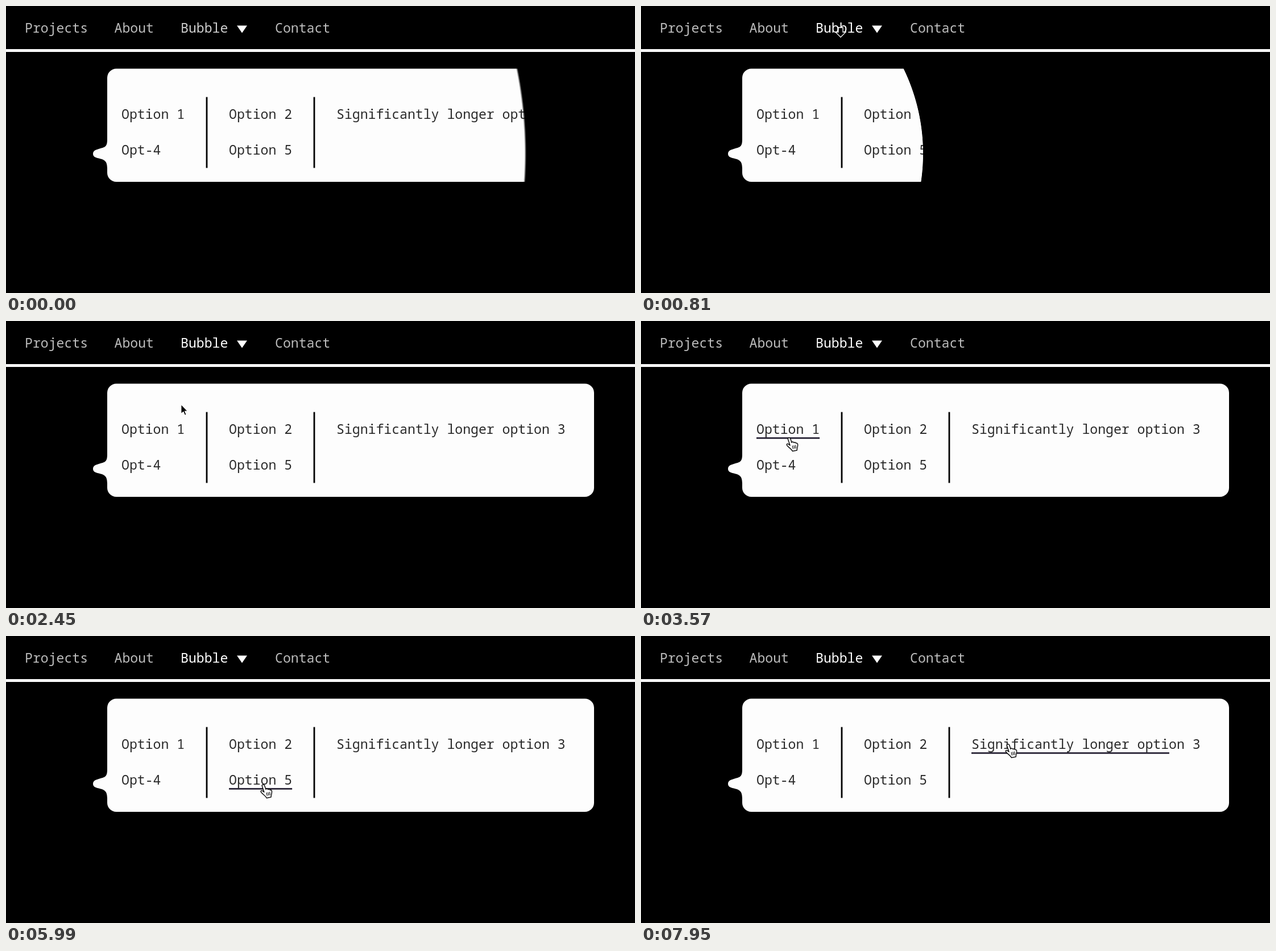
Recreate the animation shown at these times as an HTML page. Size 1106x506 px, loop 8000 ms.

```html
<!DOCTYPE html>
<html lang="en">
<head>
<meta charset="utf-8">
<title>Bubble menu</title>
<style>
  html, body { margin: 0; width: 100%; height: 100%; overflow: hidden; background: #000; }
  svg { display: block; width: 1106px; height: 506px; }
  text { font: 23.15px "Noto Sans Mono", "DejaVu Sans Mono", monospace; white-space: pre; }
  #nav text { fill: #bdbdbd; }
  #panel text { fill: #2a2a2a; }
</style>
</head>
<body>
<svg viewBox="0 0 1106 506">
  <defs>
    <radialGradient id="reveal" gradientUnits="userSpaceOnUse" cx="153" cy="260" r="1">
      <stop id="edge" offset="1" stop-color="#fff"/>
      <stop offset="1" stop-color="#000"/>
    </radialGradient>
    <mask id="mask" maskUnits="userSpaceOnUse" x="0" y="0" width="1106" height="506">
      <rect width="1106" height="506" fill="url(#reveal)"/>
    </mask>
  </defs>
  <rect width="1106" height="506"/>
  <g id="nav">
    <text x="33" y="47">Projects</text>
    <text x="190.5" y="47">About</text>
    <text x="307" y="47" id="trigger">Bubble</text>
    <text x="473" y="47">Contact</text>
    <path d="M406 34.5H424L415 47.5Z" fill="#fff"/>
    <rect y="76" width="1106" height="5" fill="#fff"/>
  </g>
  <g id="panel" mask="url(#mask)">
    <path fill="#fdfdfd" d="M194 110.5H1018A16 16 0 0 1 1034 126.5V294A16 16 0 0 1 1018 310H194A16 16 0 0 1 178 294V286
      C178 272 172 271 163 268.5C156 267 153 265 153 260.5C153 256 156 254 163 252C172 249 178 250 178 236V126.5A16 16 0 0 1 194 110.5Z"/>
    <path d="M353 160.5V285.5M542 160.5V285.5" stroke="#000" stroke-width="2.8"/>
  </g>
  <g id="cursor">
    <g id="arrow" fill="#000" stroke="#fff" stroke-width="1.3">
      <path d="M0 0V17L4 13.5L6.6 19.5L9.4 18.3L6.9 12.4H12Z"/>
    </g>
    <g id="down" fill="#000" stroke="#fff" stroke-width="1.3">
      <path d="M0 9L-9 0H-4V-8H4V0H9Z"/>
    </g>
    <g id="hand" stroke-linejoin="round" stroke-linecap="round">
      <path id="palm" fill="#fff" stroke="#111" stroke-width="1.5" d="M-1.7 2C-2 -.6 1.9 -1 2.8 1.6L5 8.2C6 6.6 8.4 6.8 9 8.6
        C10.2 7.4 12 7.8 12.6 9.6C14 8.8 15.4 9.8 15.6 11.6C16 15 14.4 17 14.2 22L6.4 23.6C5.6 20.6 .4 17.6 -2.8 14
        C-5 11.6 -3.2 9.6 -1 10.9L2 13.2Z"/>
      <path d="M6.2 14.2L7.4 19.2M9 13.7L10 18.7M11.7 13.2L12.4 18.2" fill="none" stroke="#111" stroke-width="1.2"/>
    </g>
  </g>
</svg>
<script>
const LOOP = 8000, OPEN = 628, SHUT = -86, CHAR = 13.89;
const MAX_R = 958, LINE_MS = 500;
const $ = id => document.getElementById(id);

// label, x, baseline, hover start, hover end
const links = [
  ["Option 1", 203, 199, 2480, 3700],
  ["Option 2", 392, 199, 6230, 7400],
  ["Significantly longer option 3", 581, 199, 7665, 9000],
  ["Opt-4", 203, 262, 3780, 4720],
  ["Option 5", 392, 262, 4945, 6100]
].map(([label, x, y, from, to]) => {
  const line = add("rect", { x, y: y + 6, height: 2.8, fill: "#2c2739" });
  add("text", { x, y }).textContent = label;
  return { line, from, to, width: label.length * CHAR };
});

// time, x, y of the pointer's hot spot
const path = [
  [470, 356, -22], [760, 351, 45], [810, 351, 46], [1210, 350, 49], [2250, 349, 50],
  [2560, 285, 190], [2900, 262, 204], [3570, 260, 206], [3630, 260, 207],
  [3850, 252, 245], [4560, 259, 255], [4720, 273, 257], [4945, 393, 262],
  [5010, 417, 264], [5200, 441, 265], [6000, 452, 262], [6230, 458, 207],
  [6500, 460, 200], [7110, 459, 202], [7250, 462, 202], [7400, 504, 199],
  [7665, 582, 193], [7950, 645, 191]
];

function add(tag, attrs) {
  const el = document.createElementNS("http://www.w3.org/2000/svg", tag);
  for (const k in attrs) el.setAttribute(k, attrs[k]);
  return $("panel").appendChild(el);
}

const clamp = v => Math.max(0, Math.min(1, v));
const bez = (s, a, b) => 3 * s * (1 - s) ** 2 * a + 3 * s * s * (1 - s) * b + s ** 3;

// cubic-bezier(.25, .1, .25, 1)
function ease(x) {
  if (x <= 0 || x >= 1) return clamp(x);
  let lo = 0, hi = 1;
  for (let i = 0; i < 24; i++) {
    const mid = (lo + hi) / 2;
    if (bez(mid, 0.25, 0.25) < x) lo = mid; else hi = mid;
  }
  return bez(lo, 0.1, 1);
}

function slope(i, axis) {
  if (i < 1 || i > path.length - 2) return 0;
  const rate = j => (path[j + 1][axis] - path[j][axis]) / (path[j + 1][0] - path[j][0]);
  const a = rate(i - 1), b = rate(i);
  return a * b <= 0 ? 0 : 2 * a * b / (a + b);
}

// monotone cubic through the path points
function track(t, axis) {
  let i = 0;
  while (i < path.length - 2 && t > path[i + 1][0]) i++;
  const p = path[i], q = path[i + 1], span = q[0] - p[0];
  const u = clamp((t - p[0]) / span), w = 1 - u;
  return p[axis] * (1 + 2 * u) * w * w + q[axis] * u * u * (3 - 2 * u)
    + span * u * w * (slope(i, axis) * w - slope(i + 1, axis) * u);
}

function hold(t) {
  const phase = (t + 350) % 420;
  return t - Math.max(0, phase - 320);
}

function show(id, on) {
  $(id).setAttribute("display", on ? "inline" : "none");
}

function draw(time) {
  const t = hold(time);
  const opening = t > 450;
  const k = opening ? ease((t - OPEN) / 800) : 1 - ease((t - SHUT) / 350);
  const r = MAX_R * k;
  show("panel", r > 1);
  if (r > 1) {
    const soft = Math.max(0.8, Math.min(3.5, (r - 400) / 100));
    $("reveal").setAttribute("r", r + soft / 2);
    $("edge").setAttribute("offset", clamp(1 - soft / r));
  }

  const glow = opening ? clamp((t - OPEN) / 150) : 1 - clamp((t - SHUT) / 75);
  const tone = Math.round(189 + 66 * glow);
  $("trigger").style.fill = `rgb(${tone},${tone},${tone})`;

  for (const l of links) {
    const grown = ease((t - l.from) / LINE_MS) * (1 - ease((t - l.to) / LINE_MS));
    l.line.setAttribute("width", l.width * grown);
  }

  const onLink = links.some(l => t >= l.from && t < l.to);
  const onTrigger = t >= OPEN && t < 2350;
  show("cursor", t >= 470);
  show("hand", onLink);
  show("down", onTrigger);
  show("arrow", !onLink && !onTrigger);
  $("cursor").setAttribute("transform", `translate(${track(t, 1)} ${track(t, 2)})`);
}

const start = performance.now();
function frame() {
  draw((performance.now() - start) % LOOP);
  requestAnimationFrame(frame);
}
frame();
</script>
</body>
</html>
```
